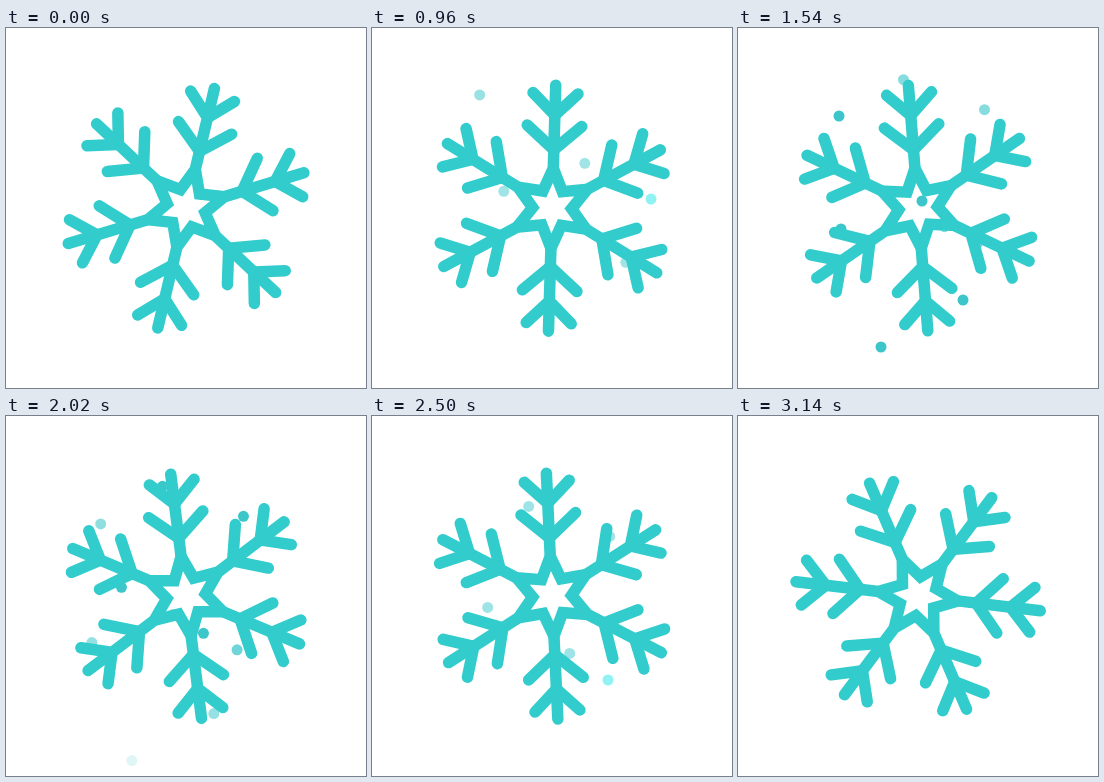
An HTML page with a canvas that plays this animation: 360x360 px, repeating every 3160 ms.

```html
<!DOCTYPE html>
<html lang="en">
<head>
<meta charset="utf-8">
<title>Snowflake</title>
<style>
html, body { margin: 0; width: 100%; height: 100%; overflow: hidden; background: #fff; }
canvas { display: block; }
</style>
</head>
<body>
<canvas id="stage" width="360" height="360"></canvas>
<script>
const ctx = document.getElementById('stage').getContext('2d');
const LOOP = 3160, HOLD = 180, STEP = 20;
const TEAL = '#33cccc', DOT = '#3cc6ca', PALE = '#90f2f2';
const START = 13.3, TURN = -1.79; // degrees, degrees per phase unit

// The phase leaps ahead by these amounts, first at step 62, then every 22 steps.
const LEAPS = [8, 11, 7, 13];

// Each group of dots is brightest at its peak, where the dots stand as listed.
const snow = [
  { dots: [[157, 68], [238, 98], [116, 169], [198, 215]],
    peak: 108, half: 50, speed: [-.15, .58], bend: [.004, .0017] },
  { dots: [[184, 173], [103, 201], [225, 272], [143, 319]],
    peak: 77, half: 52, speed: [-.63, .87], bend: [.004, -.004] },
  { dots: [[101, 88]], peak: 77, half: 54, speed: [-.18, .57] },
  { dots: [[235, 225]], peak: 95, half: 32, speed: [-.23, .52] },
  { dots: [[279, 171]], peak: 40, half: 16, speed: [-.2, .7], color: PALE },
  { dots: [[236, 264]], peak: 143, half: 28, speed: [-.2, 1.4], color: PALE }
];

const clamp = v => Math.max(0, Math.min(1, v));

function polar(r, deg) {
  const a = deg * Math.PI / 180;
  return [r * Math.sin(a), -r * Math.cos(a)];
}

function line(...points) {
  ctx.beginPath();
  points.forEach(p => ctx.lineTo(...p));
}

function drawSnow(phase) {
  for (const { dots, peak, half, speed, bend = [0, 0], color = DOT } of snow) {
    const d = phase - peak;
    if (Math.abs(d) >= half) continue;
    const glow = clamp(1.1 * Math.cos(d / half * Math.PI / 2));
    ctx.fillStyle = color;
    for (const dot of dots) {
      const [x, y] = dot.map((v, i) => v + speed[i] * d + bend[i] * d * d);
      ctx.globalAlpha = glow * clamp((355 - y) / 35); // melts near the ground
      ctx.beginPath();
      ctx.arc(x, y, 5.5, 0, 7);
      ctx.fill();
    }
  }
  ctx.globalAlpha = 1;
}

function branch(x, tip, root) {
  line([-x, -tip], [0, -root], [x, -tip]);
  ctx.stroke();
}

function drawFlake(deg) {
  ctx.save();
  ctx.translate(180.1, 180.2);
  ctx.rotate(deg * Math.PI / 180);
  ctx.strokeStyle = TEAL;
  ctx.lineWidth = 11.5;
  ctx.lineCap = 'round';
  line(...Array.from({ length: 12 }, (_, i) => polar(i % 2 ? 19.5 : 40, i * 30)));
  ctx.closePath();
  ctx.stroke();
  for (let i = 0; i < 6; i++) {
    line([0, -42], [0, -123]);
    ctx.stroke();
    branch(27.3, 82.5, 58.5);
    branch(22.5, 115, 93);
    ctx.rotate(Math.PI / 3);
  }
  ctx.restore();
}

function draw() {
  const t = performance.now() % LOOP;
  const step = t < HOLD ? 0 : Math.floor((t - HOLD) / STEP) + 1;
  const phase = LEAPS.reduce((sum, leap, i) => sum + (step >= 62 + 22 * i ? leap : 0), step);
  ctx.clearRect(0, 0, 360, 360);
  drawSnow(phase);
  drawFlake(START + TURN * phase);
  requestAnimationFrame(draw);
}
draw();
</script>
</body>
</html>
```
